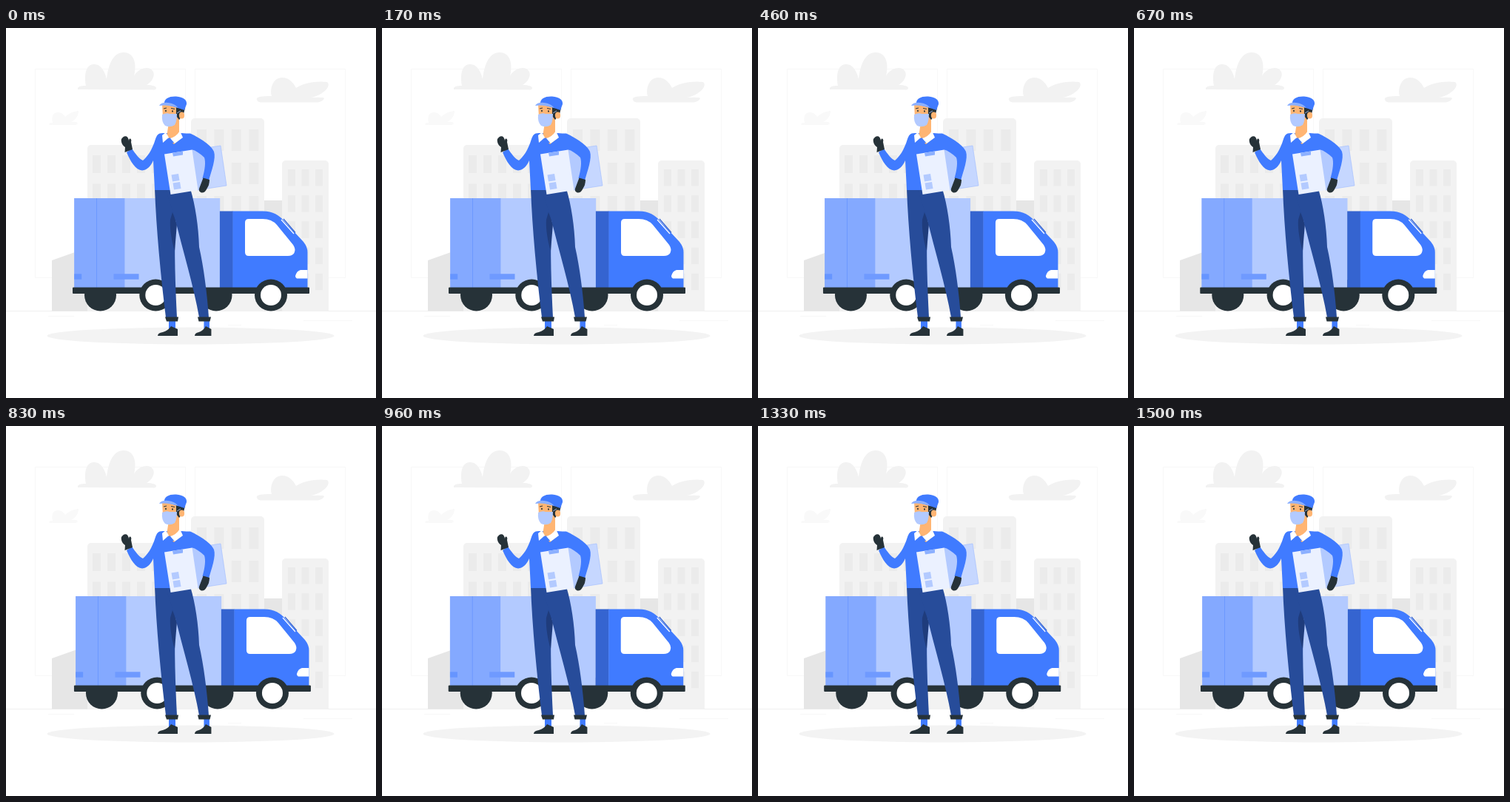
An HTML page with a canvas that plays this animation: 500x500 px, repeating every 1.54 s.

```html
<!DOCTYPE html>
<html lang="en">
<head>
<meta charset="utf-8">
<title>Delivery</title>
<style>
  html, body { margin: 0; width: 100%; height: 100%; overflow: hidden; background: #fff; }
  canvas { display: block; width: 500px; height: 500px; }
</style>
</head>
<body>
<canvas id="stage"></canvas>
<script>
const canvas = document.getElementById('stage');
const ratio = window.devicePixelRatio || 1;
canvas.width = canvas.height = 500 * ratio;
const ctx = canvas.getContext('2d');

const LOOP = 1540, FPS = 24, SHAKE_STEPS = 36, PHASE = 0.6;
const SHAKE = [0, -1, 2, -4, 4, -4, 4, -4, 2, -1, 0];
const BLUE = '#407bff', PALE = '#b3caff', DARK = '#263238', SKIN = '#ffb573', NAVY = '#274c9a';

function fill(path, color) {
  ctx.fillStyle = color;
  ctx.fill(new Path2D(path));
}

function line(path, color, width = 1) {
  ctx.strokeStyle = color;
  ctx.lineWidth = width;
  ctx.stroke(new Path2D(path));
}

function rect(x, y, w, h, color, radius = 0) {
  ctx.fillStyle = color;
  ctx.beginPath();
  ctx.roundRect(x, y, w, h, radius);
  ctx.fill();
}

function oval(x, y, rx, ry, color) {
  ctx.fillStyle = color;
  ctx.beginPath();
  ctx.ellipse(x, y, rx, ry, 0, 0, Math.PI * 2);
  ctx.fill();
}

function windows(x, y, cols, rows, dx, dy, w, h) {
  for (let r = 0; r < rows; r++)
    for (let c = 0; c < cols; c++) rect(x + c * dx, y + r * dy, w, h, '#ebebeb');
}

function drawBackground() {
  rect(0, 0, 500, 500, '#fff');
  for (const x of [39, 255]) {
    ctx.strokeStyle = '#f8f8f8';
    ctx.lineWidth = 1;
    ctx.strokeRect(x + 0.5, 55.5, 203, 282);
  }
  line('M0 382.5H500', '#efefef');
  line('M57 389.5H92M402 395.5H468M300 401.5H318', '#f8f8f8');

  fill('M97 83C96 79 101 78 108 78C106 67 106 49 119 49C129 49 134 60 136 69C138 51 144 33 159 33C174 33 177 50 173 65C177 57 187 52 195 55C204 60 199 72 190 77C198 77 203 79 203 81Q203 83.5 200 83.5Z', '#f2f2f2');
  fill('M339 97C337 93 345 92 359 92C356 82 361 67 373 67C383 67 389 75 392 81C401 74 421 71 434 73C441 79 426 92 412 94Q429 93 430 95C428 99 424 100.5 419 100.5H344Q340 100 339 97Z', '#f2f2f2');
  fill('M58 130Q58 128 63 128C61 119 64 114 70 114C75 114 78 117 80 120Q87 113 98 112C98 119 93 125 88 127Q96 126 97 129Q96 131 92 131H59Z', '#f9f9f9');

  rect(349, 233, 25, 149.5, '#e6e6e6');
  rect(110, 158, 140, 224.5, '#f2f2f2', [5, 5, 0, 0]);
  windows(117, 172, 5, 2, 20, 38.5, 11, 24);
  rect(250, 122, 99, 260.5, '#f2f2f2', [5, 5, 0, 0]);
  windows(258, 137, 4, 3, 23.4, 45, 13, 29);
  rect(373, 179, 63, 203.5, '#f2f2f2', [5, 5, 0, 0]);
  windows(381, 191, 3, 5, 18.5, 35.2, 10, 22.5);
  fill('M62 382.5V314L93 303L110 297V382.5Z', '#e6e6e6');

  oval(249.5, 416, 194, 11.5, '#f3f3f3');
}

function drawTruck() {
  for (const x of [127.5, 284]) oval(x, 361, 21.5, 21.5, DARK);

  rect(92.2, 230, 197, 121, PALE);
  rect(92.2, 230, 68.2, 121, '#84a9ff');
  line('M122.5 230V351', '#6c98ff');
  rect(92.2, 332.3, 10, 7.4, '#6695ff');
  rect(145.5, 332.3, 34, 7.4, '#6f9aff');

  rect(288.9, 247.5, 18, 103.5, '#3564d0');
  fill('M306.5 247.5H347C361 247.5 369 253 376 261L402 289Q407.5 296 407.5 303V351H306.5Z', BLUE);
  fill('M328 258H347Q359 258 366 266L388 293Q392 299 389.500 304Q387 308 381 308H328Q323 308 323 303V263Q323 258 328 258Z', '#fff');
  fill('M398 327H407.5V338.500H393Q391 338 391 335Q393 328 398 327Z', '#fff');
  line('M372 259L389 278', '#fff', 1.2);
  line('M375 258L391 276.5', '#3564d0', 1.2);

  rect(90, 350.5, 320, 8.5, DARK, 1);
  for (const x of [202.3, 358]) {
    oval(x, 361, 22, 21.5, DARK);
    oval(x, 361, 14, 14, '#fff');
  }
}

function drawShoe(x) {
  rect(x + 15, 394, 9, 13, BLUE);
  fill(`M${x + 18} 403L${x + 25} 406L${x + 27} 407V416H${x}Q${x} 412 ${x + 7} 411Q${x + 14} 409 ${x + 18} 403Z`, DARK);
}

function drawLegs() {
  drawShoe(205);
  ctx.save();
  ctx.translate(255, 0);
  ctx.scale(0.83, 1);
  drawShoe(0);
  ctx.restore();
  fill('M201 217L249 217L229 262C227 300 229 350 231 391H216C209 335 203 270 201 217Z', NAVY);
  fill('M225 249L231 265L228 301C224 290 221 270 222 259Z', '#1f3c7c');
  fill('M215 217H249C256 240 260 268 261 296C267 322 272 360 274 391H261C254 350 239 301 227 252Z', NAVY);
  fill('M215 390.500H233L232 396.500H217Z', DARK);
  fill('M259 390.500H277L275.500 396.500H260.500Z', DARK);
}

function drawBody() {
  fill('M212 142C205 142 204 145 202 150C197 166 191 174 185 179C180 177 175 170 170 163L163 168C168 180 175 192 184 192.500C191 192 196 186 199 179L201 219H250L262 165L250 144L237 142Z', BLUE);
  fill('M160.500 168L161 161C157 159 155 153 156 150Q159 145 163 146.500Q166 149 166 153Q166 149 168 149.500Q170 151 169 154L171 164Z', DARK);

  fill('M251 165L290 159L298 213L259 219Z', '#c6d7ff');
  fill('M251 165L270 162V217L259 219Z', PALE);
  line('M251 165L290 159L298 213L259 219', '#a6c1ff', 0.7);
  fill('M214 170.500L251.500 164.500L259.500 219L222.500 225Z', '#ebf1ff');
  fill('M225 168.800L239 166.500V171.500L226 173.500Z', '#8cb0ff');
  fill('M223.500 198.500L233 197L234.500 206L225 207.500Z', PALE);
  fill('M225.500 209.500L235 208L236.500 217L227 218.500Z', PALE);

  fill('M236 142.500H249C263 149 278 159 281 167C284 176 278 192 274 206L265.500 203C269 191 270 181 268 175C263 170 257 166 251 164L238 164Z', BLUE);
  fill('M266.500 202.500L275 205Q275 212 271.500 217Q269 223 264 222.500Q260 221 261 217Z', DARK);
}

function drawHead() {
  fill('M217 147L220 128L234 119L234 140L238 148L227 157Z', SKIN);
  fill('M215 153Q218 147 224 149L228 155H214Z', BLUE);
  fill('M216 141L211 145L212 155L220 148Z', '#fff');
  fill('M235 139L239 148L228 156L222 149Q230 147 235 139Z', '#fff');

  fill('M211 103L234 104L235 122Q231 132 222 132Q213 132 212 121Z', SKIN);
  fill('M230 107L242 108L240 116L234 124L230 119Z', DARK);
  oval(237.5, 118, 3.6, 4.5, SKIN);
  line('M231 115L236 112', PALE, 0.8);
  fill('M211 117Q217 114 221 116L231 116Q231 126 228 131Q222 135 215 132Q210 127 211 117Z', PALE);
  oval(216, 112, 0.9, 1.3, DARK);
  oval(225, 112.500, 0.9, 1.3, DARK);
  line('M213 109L217 108M223 108.500L228 109.500', DARK, 1);

  fill('M214 103C213 95 221 92 230 92.500C240 93 245 98 244 103L241 111Q230 107 214 103Z', BLUE);
  fill('M207 105Q210 100 219 101Q228 102 233 108Q218 103 207 105Z', '#8cb0ff');
}

// Shake offset, stepped at the playback frame rate.
function shakeAt(time) {
  const step = Math.floor((time + 5) * FPS / 1000);
  const pos = ((step + PHASE) % SHAKE_STEPS) / SHAKE_STEPS * (SHAKE.length - 1);
  const i = Math.floor(pos);
  return SHAKE[i] + (SHAKE[i + 1] - SHAKE[i]) * (pos - i);
}

function draw(time) {
  ctx.setTransform(ratio, 0, 0, ratio, 0, 0);
  drawBackground();
  ctx.save();
  ctx.translate(shakeAt(time) + 0.17, 0);
  drawTruck();
  ctx.restore();
  drawLegs();
  drawBody();
  drawHead();
}

const start = performance.now();
function tick() {
  draw((performance.now() - start) % LOOP);
  requestAnimationFrame(tick);
}
tick();
</script>
</body>
</html>
```
